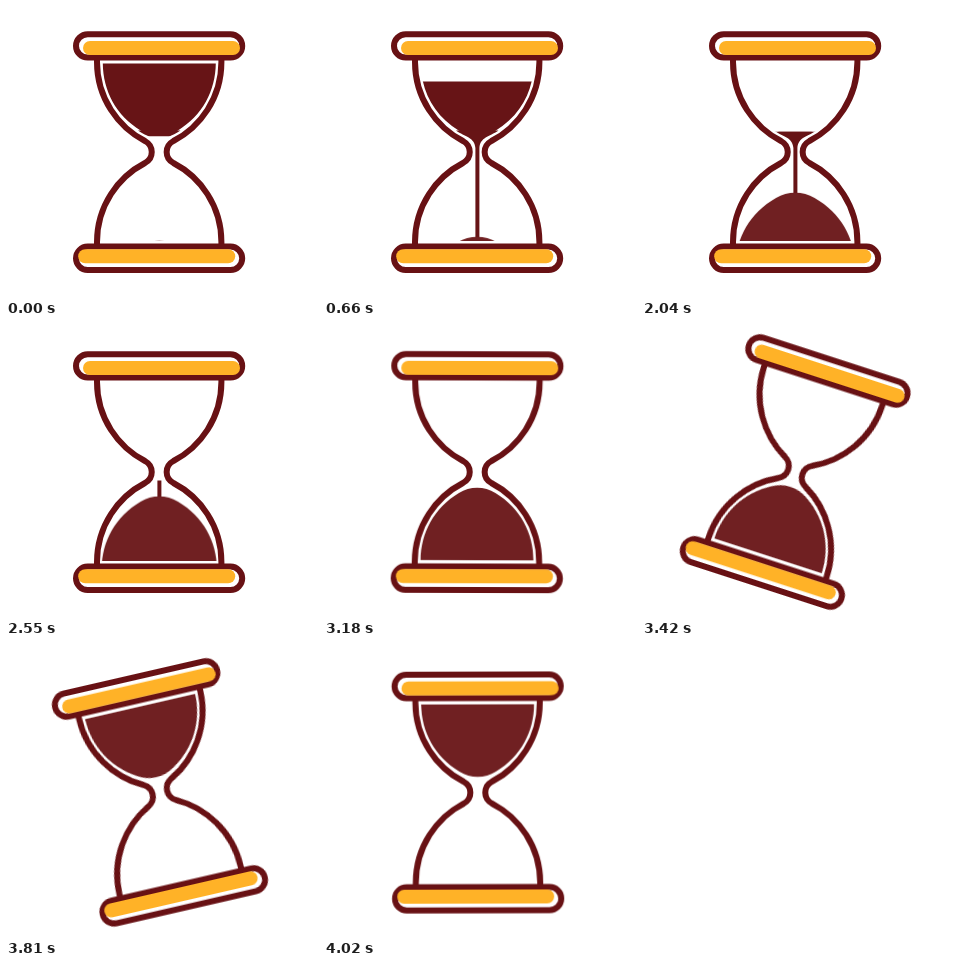
These frames come from a looping animation (312x292 px, 4.05 s). An HTML page:

```html
<!DOCTYPE html>
<html lang="en">
<head>
<meta charset="utf-8">
<title>Hourglass</title>
<style>
  html, body { margin: 0; width: 100%; height: 100%; overflow: hidden; background: #fff; }
  #hourglass, #hourglass > svg { position: absolute; left: 0; top: 0; width: 312px; height: 292px; }
  #hourglass > svg { overflow: visible; }
  #hourglass {
    transform-origin: 153.5px 146.3px;
    animation: turn 4050ms infinite;
  }
  .line { fill: none; stroke: #681114; stroke-width: 6; }
  .cap { fill: #fff; stroke: #681114; stroke-width: 6; }
  .shine { fill: #ffb227; }

  #falling { fill: #671416; animation: drain 4050ms linear infinite; }
  #pile { clip-path: inset(0 0 57.7px 0); }
  #mound {
    fill: #702022;
    transform-origin: 153.3px 234px;
    animation: rise 4050ms linear infinite;
  }

  /* 3150 ms of rest, then a half turn */
  @keyframes turn {
    0%, 77.778% { transform: rotate(0deg); animation-timing-function: cubic-bezier(.7, 0, .3, 1); }
    100% { transform: rotate(180deg); }
  }
  /* top edge follows the sand level, bottom edge the front of the stream */
  @keyframes drain {
    0% { clip-path: inset(51.5px 0 162px 0); }
    13.333% { clip-path: inset(71.1px 0 58px 0); }
    58.765% { clip-path: inset(138px 0 58px 0); }
    66.42% { clip-path: inset(168px 0 58px 0); }
    66.667%, 100% { clip-path: inset(234px 0 58px 0); }
  }
  @keyframes rise {
    0%, 13.333% { transform: translateY(73px) scaleX(1.07); }
    40% { transform: translateY(38.4px) scaleX(1.07); }
    53.333% { transform: translateY(21.1px) scaleX(1.05); }
    69.63%, 100% { transform: translateY(0) scaleX(1); }
  }
</style>
</head>
<body>
<div id="hourglass">
  <svg id="falling" viewBox="0 0 312 292">
    <use href="#dome" transform="matrix(1 0 0 -1 0 291.7)"/>
    <path d="M132 124.5C141 131 150.5 131 151.4 142V234H155.4V142C156.3 131 165 131 174.5 124.5Z"/>
  </svg>
  <svg id="pile" viewBox="0 0 312 292">
    <g id="mound">
      <path id="dome" d="M96.8 234.2C97 207 110 182 135 167C146 160 160.5 160 171.5 167C196.5 182 209.5 207 209.8 234.2Z"/>
    </g>
  </svg>
  <svg viewBox="0 0 312 292">
    <path id="side" class="line" d="M91 50V56C91 92 112 121 139 135C148 140 148 152 139 157C112 171 91 200 91 236V242"/>
    <use href="#side" transform="matrix(-1 0 0 1 306.4 0)"/>
    <g id="lid">
      <rect class="cap" x="70" y="28.2" width="166.2" height="23.4" rx="11.7"/>
      <rect class="shine" x="77" y="35" width="157" height="14" rx="7"/>
    </g>
    <use href="#lid" transform="rotate(180 153.1 146.1)"/>
  </svg>
</div>
</body>
</html>
```
